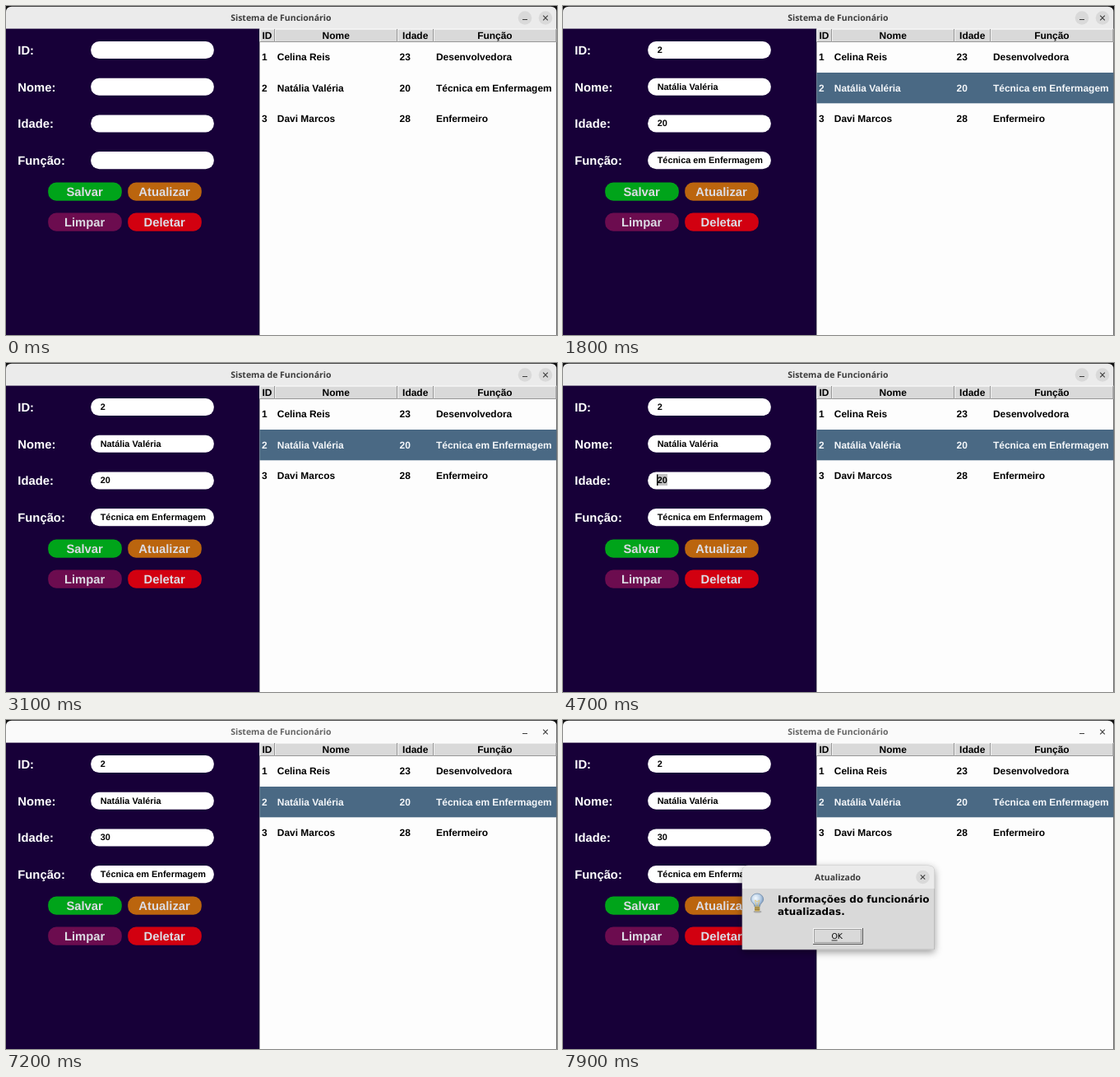
Recreate the animation shown at these times as an HTML page. Size 670 by 400 pixels, loop 8000 ms.

```html
<!DOCTYPE html>
<html lang="pt">
<head>
<meta charset="utf-8">
<title>Sistema de Funcionário</title>
<style>
  html, body { margin: 0; width: 100%; height: 100%; overflow: hidden; background: #101010; }
  svg { display: block; width: 670px; height: 400px; }
  text { text-rendering: geometricPrecision; white-space: pre; }
  .ui { font: bold 11.95px "Liberation Sans", Arial, sans-serif; }
  .label { font-size: 14.8px; fill: #fff; }
  .button { font-size: 14.8px; fill: #dcdce4; text-anchor: middle; }
  .entry { font-size: 10.9px; fill: #000; }
  .mid { text-anchor: middle; }
  .title { font: bold 10.5px "Noto Sans", "Open Sans", sans-serif; fill: #3d3d3d; text-anchor: middle; }
  .message { font: bold 11.95px "DejaVu Sans", sans-serif; }
  .ok { font: 9.4px "DejaVu Sans", sans-serif; }
</style>
</head>
<body>
<svg id="stage" viewBox="0 0 670 400" xmlns="http://www.w3.org/2000/svg">
  <defs>
    <filter id="shadow" x="-20%" y="-30%" width="140%" height="170%">
      <feDropShadow dx="0" dy="3" stdDeviation="5" flood-color="#000" flood-opacity=".4"/>
    </filter>
    <radialGradient id="glass" cx=".38" cy=".35" r=".7">
      <stop offset="0" stop-color="#f4faff"/>
      <stop offset=".55" stop-color="#b9cfe6"/>
      <stop offset="1" stop-color="#6f8fb4"/>
    </radialGradient>
  </defs>
</svg>
<script>
const LOOP = 8000;
const SELECT = 1400, FILL = 1600, MARK = 4000, CLEAR = 5000;
const CARET_FROM = 3800, CARET_TO = 7100, BLUR = 7200, DIALOG = 7300;
const TOP = 27.6, SPLIT = 308.4, RIGHT = 669.4;

const stage = document.getElementById('stage');

function add(tag, attrs, parent = stage) {
  const el = document.createElementNS('http://www.w3.org/2000/svg', tag);
  for (const key in attrs) el.setAttribute(key, attrs[key]);
  parent.appendChild(el);
  return el;
}
const rect = (x, y, width, height, fill, rx = 0, parent) =>
  add('rect', { x, y, width, height, fill, rx }, parent);
const path = (d, stroke, parent, width = 1) =>
  add('path', { d, stroke, fill: 'none', 'stroke-width': width }, parent);
function text(x, y, str, cls, parent) {
  const el = add('text', { x, y, class: cls }, parent);
  el.textContent = str;
  return el;
}
const show = (el, on) => el.setAttribute('visibility', on ? 'visible' : 'hidden');

// Window frame
const bar = add('path', { d: `M0 28V7.5Q0 .7 7 .7H${RIGHT - 7}Q${RIGHT} .7 ${RIGHT} 7.5V28Z` });
const title = text(334.3, 18.3, 'Sistema de Funcionário', 'title');
const discs = [631, 656].map(cx => add('circle', { cx, cy: 14.5, r: 8.3, fill: '#d9d9d9' }));
path('M628 16.5h6', '#3d3d3d');
path('M653.2 11.7l5.6 5.6m0-5.6l-5.6 5.6', '#3d3d3d', stage, 1.1);
rect(0, TOP, SPLIT, 400 - TOP, '#170038');
rect(SPLIT, TOP, RIGHT - SPLIT, 400 - TOP, '#fdfdfd');

// Form
const entries = ['ID:', 'Nome:', 'Idade:', 'Função:'].map((name, i) => {
  const y = 43 + i * 44.7;
  text(14.3, y + 16, name, 'ui label');
  rect(103.2, y, 149.6, 21.1, '#fff', 10);
  return { y };
});
const mark = rect(114, 135, 13, 14, '#c3c3c3');
entries.forEach(e => { e.el = text(114.7, e.y + 14, '', 'ui entry'); });
const caret = rect(126, 135.5, 1.4, 13.5, '#000');

[['Salvar', 51, 214, '#00a41a'], ['Atualizar', 148, 214, '#bb650e'],
 ['Limpar', 51, 251, '#6c0c4f'], ['Deletar', 148, 251, '#d20010']].forEach(([name, x, y, fill]) => {
  rect(x + .2, y + .5, 89.6, 22.3, fill, 10);
  text(x + 44.6, y + 17, name, 'ui button');
});

// Table
const columns = [['ID', SPLIT, 18.6], ['Nome', 327, 149], ['Idade', 476, 44], ['Função', 520, 149.4]];
columns.forEach(([name, x, w]) => {
  rect(x, 28, w, 16, '#d9d9d9');
  path(`M${x + .5} 43V28.5H${x + w}`, '#f0f0f0');
  path(`M${x} 43.5H${x + w - .5}V28`, '#979797');
  text(x + w / 2 - .3, 40.4, name, 'ui mid');
});
const people = [
  ['1', 'Celina Reis', '23', 'Desenvolvedora'],
  ['2', 'Natália Valéria', '20', 'Técnica em Enfermagem'],
  ['3', 'Davi Marcos', '28', 'Enfermeiro']
];
const highlight = rect(SPLIT, 81, RIGHT - SPLIT, 37.3, '#4a6984');
const rows = people.map((cells, r) =>
  cells.map((cell, c) => text([311, 329.8, 478.5, 523][c], 66.4 + r * 37.2, cell, 'ui')));

// Message box
const dialog = add('g', {});
add('path', { d: 'M218 279V184Q218 177 225 177H444Q451.5 177 451.5 184V279Z',
  fill: '#d9d9d9', stroke: '#a8a8a8', 'stroke-width': .6, filter: 'url(#shadow)' }, dialog);
add('path', { d: 'M218 205V184Q218 177 225 177H444Q451.5 177 451.5 184V205Z', fill: '#ebebeb' }, dialog);
text(334, 195, 'Atualizado', 'title', dialog);
add('circle', { cx: 437.5, cy: 191, r: 8.3, fill: '#d9d9d9' }, dialog);
path('M434.8 188.3l5.4 5.4m0-5.4l-5.4 5.4', '#3d3d3d', dialog, 1.1);

add('ellipse', { cx: 236.5, cy: 233, rx: 5, ry: 1.6, fill: '#aaa' }, dialog);
add('path', { d: 'M233 227C233 223 228.5 222 228.5 218A7.6 7 0 0 1 243.7 218C243.7 222 239.3 223 239.3 227Z',
  fill: 'url(#glass)', stroke: '#6683a4', 'stroke-width': .7 }, dialog);
path('M235 226l-1.5-7 2.6 2 2.6-2-1.5 7', '#e8c66a', dialog, .8);
rect(233, 226.5, 6.3, 6, '#c9ab55', 1.5, dialog);
path('M233 228.5h6.3m-6.3 2h6.3', '#786535', dialog, .7);

text(261, 222.4, 'Informações do funcionário', 'message', dialog);
text(261, 236.6, 'atualizadas.', 'message', dialog);
rect(304, 253, 60.5, 19.5, '#d9d9d9', 0, dialog);
path('M304.5 272V253.5H364', '#f8f8f8', dialog);
path('M304 272.5H364.5V253', '#555', dialog);
add('rect', { x: 305.5, y: 254.5, width: 57, height: 16, fill: 'none', stroke: '#333',
  'stroke-width': .7, 'stroke-dasharray': '1 1' }, dialog);
text(326.4, 266.3, 'OK', 'ok', dialog);
path('M326.6 268h7', '#000', dialog, .8);

function age(t) {
  if (t < CLEAR) return '20';
  if (t < 5200) return '';
  return t < 5300 ? '3' : '30';
}

function draw(t) {
  const selected = t >= SELECT, filled = t >= FILL, blurred = t >= BLUR;

  show(highlight, selected);
  rows[1].forEach(el => el.setAttribute('fill', selected ? '#f4f7fa' : '#000'));

  const values = [...people[1]];
  values[2] = age(t);
  entries.forEach((e, i) => { e.el.textContent = filled ? values[i] : ''; });

  // The caret is lit 600 ms and dark 300 ms
  show(caret, t >= CARET_FROM && t < CARET_TO && (t - CARET_FROM) % 900 < 600);
  const caretPos = t < MARK ? 2 : t < CLEAR ? 0 : values[2].length;
  caret.setAttribute('x', 114 + caretPos * 6.06);
  show(mark, t >= MARK && t < CLEAR);

  bar.setAttribute('fill', blurred ? '#fafafa' : '#ebebeb');
  title.style.fill = blurred ? '#666' : '#3d3d3d';
  discs.forEach(el => show(el, !blurred));
  show(dialog, t >= DIALOG);
}

const start = performance.now();
function tick() {
  draw((performance.now() - start) % LOOP);
  requestAnimationFrame(tick);
}
tick();
</script>
</body>
</html>
```
